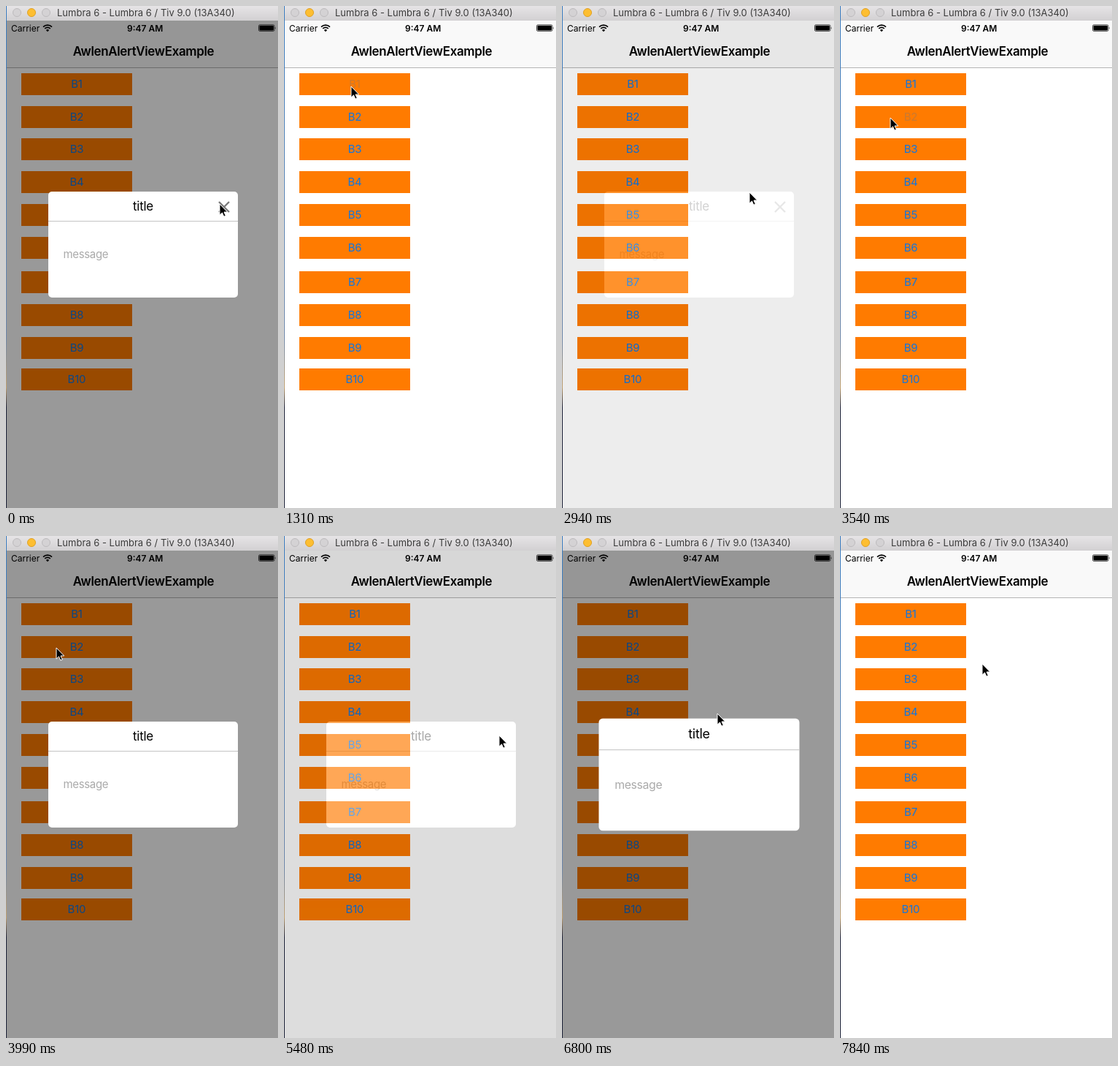
These frames come from a looping animation (373 px wide and 687 px high, 7990 ms). An HTML page:

```html
<!DOCTYPE html>
<html lang="en">
<head>
<meta charset="utf-8">
<title>Alert view demo</title>
<style>
  html, body { margin: 0; width: 100%; height: 100%; overflow: hidden; }
  body { position: relative; background: #fff; font-family: Inter, Roboto, sans-serif; }
  div, svg { position: absolute; }
  div { white-space: nowrap; }
  #edge { left: 0; top: 0; width: 1px; height: 687px;
    background: linear-gradient(#3a7cc0, #6d86a8 66%, #c0a070 76%, #1d2238 80%); }
  #win { left: 0; top: 0; width: 373px; height: 20px; background: linear-gradient(#e6e4e6, #d2d0d2); }
  #win i { position: absolute; top: 3px; left: 9px; width: 10px; height: 10px; border-radius: 50%;
    background: #d4d2d4; border: 1px solid #bdbbbd; }
  #win i:nth-child(2) { left: 29px; background: #fdbe31; border-color: #dfa023; }
  #win i:nth-child(3) { left: 49px; }
  #win span { position: absolute; left: 70px; top: 0; font-size: 13px; line-height: 19px; color: #3c3c3c; }
  #app { left: 1px; top: 20px; width: 372px; height: 667px; background: #fff; overflow: hidden; }
  #bar { left: 0; top: 0; width: 372px; height: 64px; background: #f9f9f9; border-bottom: 1px solid #b4b4b4; }
  .status { top: 3px; font-size: 12px; line-height: 15px; color: #000; }
  #head { left: 0; width: 375px; top: 31px; text-align: center; font-size: 17px; line-height: 22px;
    font-weight: 600; letter-spacing: -.36px; color: #000; }
  .btn { left: 20px; width: 152px; height: 30px; background: #ff7b00; color: #0f76e0;
    text-align: center; font-size: 15px; line-height: 30px; letter-spacing: -.2px; }
  .btn.down { color: rgba(15, 118, 224, .22); }
  #modal { left: 0; top: 0; width: 372px; height: 667px; }
  #shade { left: 0; top: 0; width: 100%; height: 100%; background: rgba(0, 0, 0, .4); }
  #box { left: 57px; top: 234px; width: 260px; height: 145px; border-radius: 5px; background: #fff; }
  #box .title { left: 0; width: 260px; top: 0; height: 40px; border-bottom: 1px solid #c4c4c4;
    text-align: center; font-size: 17px; line-height: 41px; letter-spacing: -.3px; color: #000; }
  #box .text { left: 20.5px; top: 75.5px; font-size: 15px; line-height: 20px; letter-spacing: -.35px; color: #aaa; }
  #close { left: 233px; top: 13px; }
  #cursor { left: 0; top: 0; overflow: visible; }
</style>
</head>
<body>
<div id="app">
  <div id="bar"></div>
  <div class="status" style="left:6px">Carrier</div>
  <svg style="left:49px;top:4px" width="14" height="12" viewBox="0 0 14 12" fill="none" stroke="#000" stroke-width="1.7">
    <path d="M1 4.6a8.4 8.4 0 0 1 12 0M3.2 7a5.4 5.4 0 0 1 7.6 0"/>
    <path d="M7 11.3L4.9 9.1a3 3 0 0 1 4.2 0z" fill="#000" stroke="none"/>
  </svg>
  <div class="status" style="left:165px;font-weight:600">9:47 AM</div>
  <svg style="left:345px;top:5px" width="26" height="11">
    <rect x=".5" y=".8" width="21.5" height="8.6" rx="1.6" fill="none" stroke="#000" stroke-width=".7"/>
    <rect x="1.5" y="1.8" width="19.5" height="6.6" rx=".8"/>
    <path d="M22.8 3.4q1.6 1.7 0 3.4z"/>
  </svg>
  <div id="head">AwlenAlertViewExample</div>
  <div id="modal">
    <div id="shade"></div>
    <div id="box">
      <div class="title">title</div>
      <div class="text">message</div>
      <svg id="close" width="16" height="16"><path d="M1 1L15 15M15 1L1 15" stroke="#7c7c7c" stroke-width="2.4"/></svg>
    </div>
  </div>
</div>
<div id="win"><i></i><i></i><i></i><span>Lumbra 6 - Lumbra 6 / Tiv 9.0 (13A340)</span></div>
<div id="edge"></div>
<svg id="cursor" width="12" height="18">
  <path d="M0 0V15.2L3.5 11.9L5.8 17.2L8.3 16.1L6 11H10.7Z" fill="#000" stroke="#fff" stroke-width="1" stroke-linejoin="round"/>
</svg>
<script>
const $ = id => document.getElementById(id);
const LOOP = 7990, TICK = 148, LEAD = 22, LAST = 53;
const FADE = 1.65, POP = 2, BACK = 1.464; // fade and pop lengths in ticks, overshoot

// each alert opens one tick after its button is pressed; times in ticks
const ALERTS = [
  { open: -9, close: .3, cross: true },
  { open: 10, close: 18.8, cross: true },
  { open: 25, close: 36 },
  { open: 45, close: 50.5 }
];

// where the pointer rests, and from when to when
const STOPS = [
  { from: 0, to: 1, x: 293, y: 271 },
  { from: 8, to: 10, x: 92, y: 110 },
  { from: 16, to: 17, x: 293, y: 271 },
  { from: 20, to: 20, x: 257, y: 255 },
  { from: 24, to: 28, x: 69, y: 153 },
  { from: 35, to: 37, x: 295, y: 273 },
  { from: 43, to: 44, x: 110, y: 197 },
  { from: 46, to: 46, x: 213, y: 243 },
  { from: 49, to: LAST, x: 195, y: 175 }
];

const buttons = [92, 137, 181, 226, 271, 316, 363, 408, 453, 496].map((y, i) => {
  const b = document.createElement('div');
  b.className = 'btn';
  b.textContent = 'B' + (i + 1);
  b.style.top = y - 20 + 'px';
  $('app').insertBefore(b, $('modal'));
  return b;
});

const clamp = u => Math.max(0, Math.min(1, u));
const smooth = u => (1 - Math.cos(Math.PI * clamp(u))) / 2;
const backOut = u => 1 + (BACK + 1) * (u - 1) ** 3 + BACK * (u - 1) ** 2;

function pointer(tick) {
  const i = STOPS.findIndex(s => tick <= s.from);
  if (i < 1) return i < 0 ? STOPS[STOPS.length - 1] : STOPS[0];
  const a = STOPS[i - 1], b = STOPS[i];
  const u = a.to < b.from ? smooth((tick - a.to) / (b.from - a.to)) : 1;
  return { x: a.x + (b.x - a.x) * u, y: a.y + (b.y - a.y) * u };
}

function draw(ms) {
  const tick = Math.min(LAST, Math.floor((ms + LEAD) / TICK));
  const alert = ALERTS.filter(a => a.open <= tick).pop();
  $('modal').style.opacity = 1 - smooth((tick - alert.close) / FADE);
  $('box').style.transform = `scale(${backOut(clamp((tick - alert.open) / POP))})`;
  $('close').style.display = alert.cross ? '' : 'none';
  const pressed = ALERTS.findIndex(a => a.open === tick + 1) - 1;
  buttons.forEach((b, i) => b.classList.toggle('down', i === pressed));
  const p = pointer(tick);
  $('cursor').style.transform = `translate(${Math.round(p.x)}px, ${Math.round(p.y)}px)`;
}

const start = performance.now();
function loop() {
  draw((performance.now() - start) % LOOP);
  requestAnimationFrame(loop);
}
loop();
</script>
</body>
</html>
```
